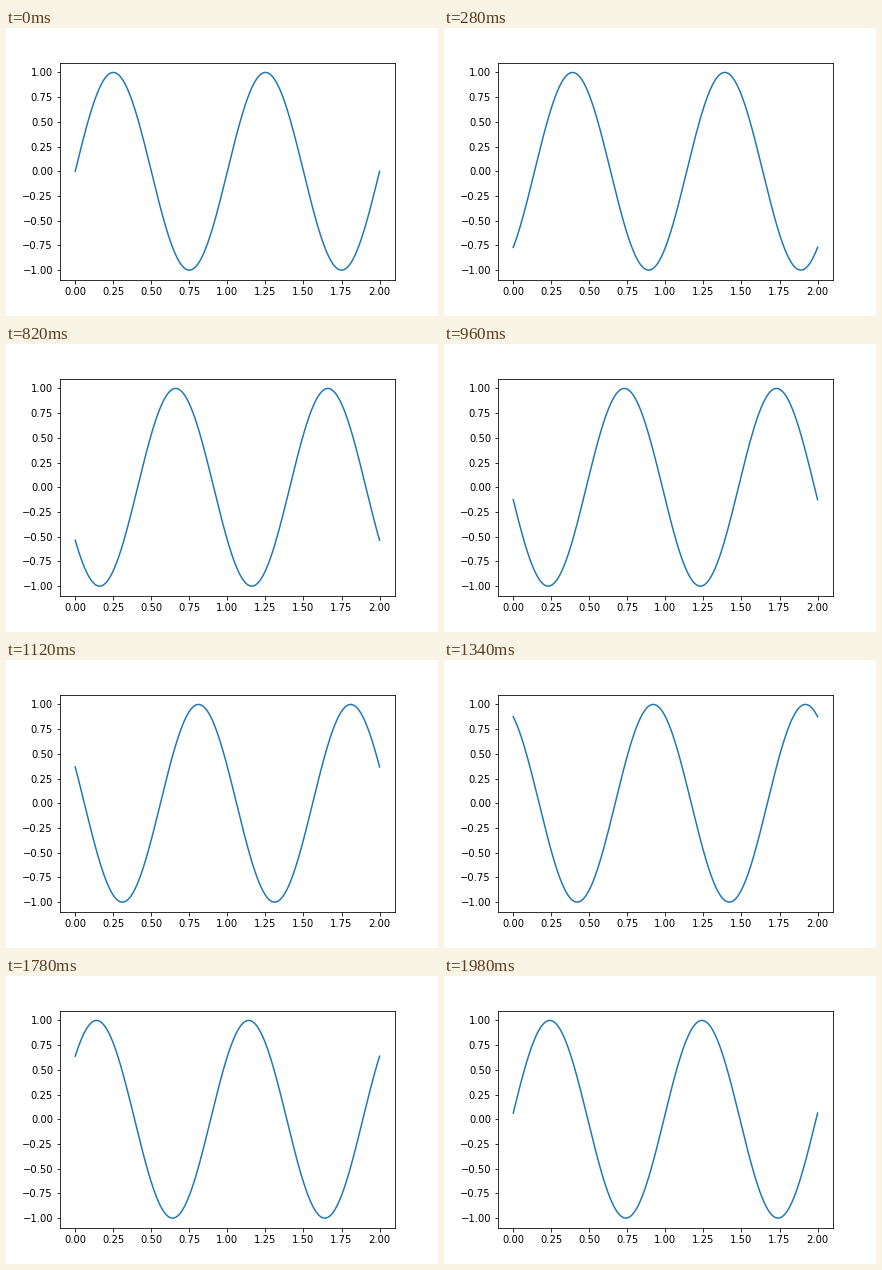
Write a matplotlib script that moves like this. It is 432x288 px and loops after 2 s.

```python
import numpy as np
import matplotlib.pyplot as plt
from matplotlib.animation import FuncAnimation

FRAMES = 100
INTERVAL = 20  # ms

x = np.linspace(0, 2, 1000)


def wave(i):
    """Sine wave that travels one period to the right per loop."""
    return np.sin(2 * np.pi * (x - i / FRAMES))


fig, ax = plt.subplots(figsize=(6, 4), dpi=72)
fig.subplots_adjust(bottom=0.125)
line, = ax.plot(x, wave(0))
ax.set_xlim(-0.1, 2.1)
ax.set_ylim(-1.1, 1.1)


def update(i):
    line.set_ydata(wave(i))
    return line,


anim = FuncAnimation(fig, update, frames=FRAMES, interval=INTERVAL,
                     repeat=True, repeat_delay=0)
plt.show()
```
